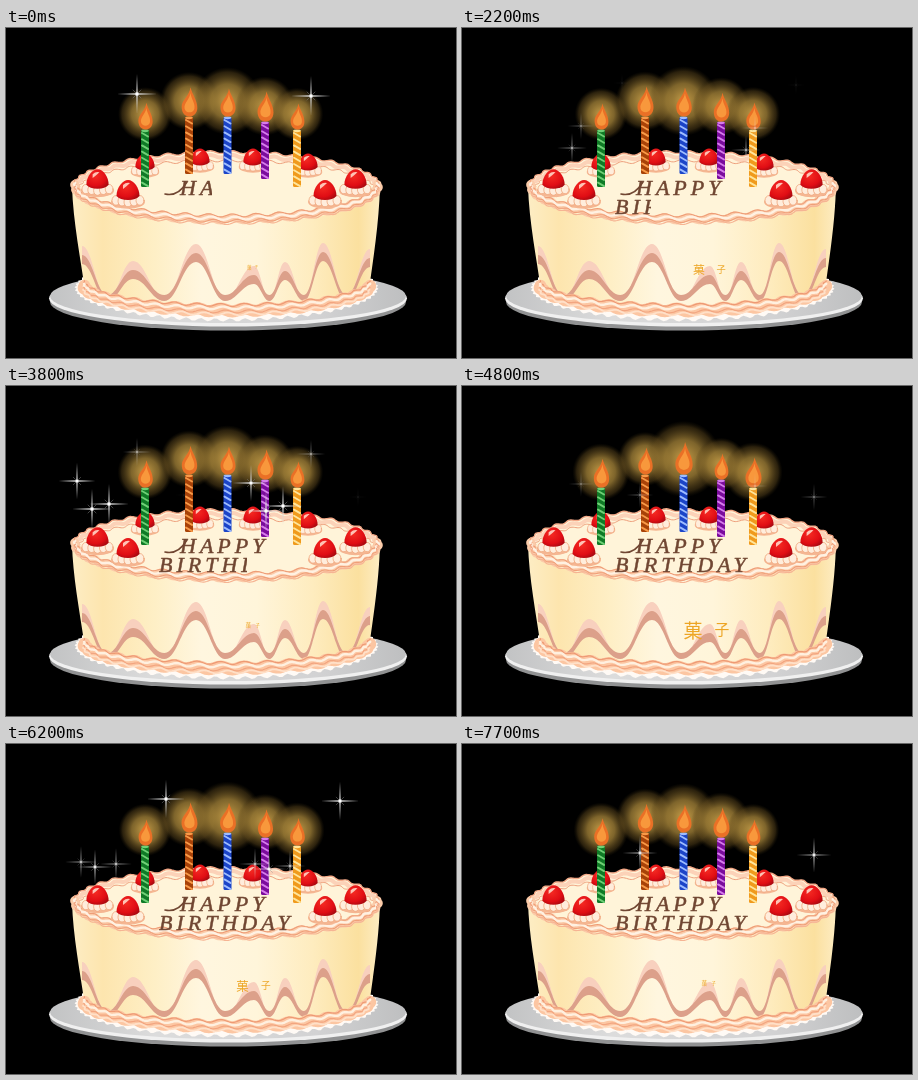
An HTML page that plays this animation: 450x330 px, repeating every 7.8 s.

```html
<!DOCTYPE html>
<html lang="en">
<head>
<meta charset="utf-8">
<title>Birthday cake</title>
<style>
html, body { margin: 0; width: 100%; height: 100%; overflow: hidden; background: #000; }
svg { display: block; width: 450px; height: 330px; }
.icing { font: italic 22px "Liberation Serif", "Noto Serif", serif; letter-spacing: 4px; fill: #704632; stroke: #704632; stroke-width: .5; }
.name { font: 500 20px "Noto Sans CJK JP", "Noto Sans CJK", sans-serif; fill: #eda524; text-anchor: middle; }
</style>
</head>
<body>
<svg viewBox="0 0 450 330" fill="none" stroke-linecap="round" stroke-linejoin="round">
  <defs>
    <radialGradient id="glow">
      <stop offset="0" stop-color="#d0a64c" stop-opacity=".95"/>
      <stop offset=".5" stop-color="#a8863a" stop-opacity=".75"/>
      <stop offset=".85" stop-color="#6b5220" stop-opacity=".4"/>
      <stop offset="1" stop-color="#3a2c0c" stop-opacity="0"/>
    </radialGradient>
    <linearGradient id="side">
      <stop offset="0" stop-color="#fdedc4"/>
      <stop offset=".1" stop-color="#fde5ae"/>
      <stop offset=".27" stop-color="#feefc6"/>
      <stop offset=".42" stop-color="#fff6df"/>
      <stop offset=".6" stop-color="#fff5da"/>
      <stop offset=".78" stop-color="#feecbf"/>
      <stop offset=".93" stop-color="#fbe09f"/>
      <stop offset="1" stop-color="#fdecc2"/>
    </linearGradient>
    <linearGradient id="plate">
      <stop offset="0" stop-color="#c2c3c4"/>
      <stop offset=".3" stop-color="#dcdcdc"/>
      <stop offset=".75" stop-color="#d2d2d3"/>
      <stop offset="1" stop-color="#bebfc0"/>
    </linearGradient>
    <radialGradient id="berry" cx=".4" cy=".35" r=".75">
      <stop offset="0" stop-color="#f52a22"/>
      <stop offset=".65" stop-color="#e00d14"/>
      <stop offset="1" stop-color="#a00810"/>
    </radialGradient>
    <clipPath id="row1"><rect x="150" y="148" height="22"/></clipPath>
    <clipPath id="row2"><rect x="140" y="169" height="24"/></clipPath>
  </defs>
  <g id="glows"></g>
  <g id="cake"></g>
  <g clip-path="url(#row1)">
    <path d="M159,166Q172,169 181,154" stroke="#704632" stroke-width="1.6"/>
    <text class="icing" x="174" y="167">HAPPY</text>
  </g>
  <g clip-path="url(#row2)"><text class="icing" x="153" y="186">BIRTHDAY</text></g>
  <g class="name"><text id="name1">菓</text><text id="name2">子</text></g>
  <g id="candles"></g>
  <g id="stars"></g>
</svg>
<script>
const STEP = 100, COUNT = 78, TAU = Math.PI * 2, CENTER = 220.5;
const $ = id => document.getElementById(id);

function set(node, attrs) {
  for (const key in attrs) node.setAttribute(key, attrs[key]);
}
function add(parent, tag, attrs = {}) {
  const node = document.createElementNS("http://www.w3.org/2000/svg", tag);
  set(node, attrs);
  parent.appendChild(node);
  return node;
}
const shape = (parent, d, fill) => add(parent, "path", { d, fill });
const line = (parent, d, stroke, width) => add(parent, "path", { d, stroke, "stroke-width": width });
const ellipse = (parent, cx, cy, rx, ry, fill) => add(parent, "ellipse", { cx, cy, rx, ry, fill });

// Part of an ellipse with a ripple along it; angles in turns, clockwise from the right.
function ripple(cy, rx, ry, from, to, amp, waves, phase = 0) {
  let d = "";
  for (let i = 0; i <= 300; i++) {
    const a = from + (to - from) * i / 300;
    const r = amp * Math.sin(TAU * (a * waves + phase));
    const x = CENTER + (rx + r * .6) * Math.cos(TAU * a);
    const y = cy + (ry + r) * Math.sin(TAU * a);
    d += (i ? "L" : "M") + x.toFixed(1) + "," + y.toFixed(1);
  }
  return d;
}

// Linear interpolation through [time, value] pairs.
function track(keys, t) {
  const i = keys.findIndex(([time]) => time >= t);
  if (i < 0) return keys[keys.length - 1][1];
  if (i === 0) return keys[0][1];
  const [t0, v0] = keys[i - 1], [t1, v1] = keys[i];
  return v0 + (v1 - v0) * (t - t0) / (t1 - t0);
}

// Curve through crests and troughs, level at each.
function waveThrough(points) {
  return points.map(([x, y], i) => {
    if (!i) return `${x},${y}`;
    const [x0, y0] = points[i - 1], bend = (x - x0) * .42;
    return `C${x0 + bend},${y0} ${x - bend},${y} ${x},${y}`;
  }).join("");
}

function drawDrips(g) {
  const crests = [[76, 218], [127, 233], [190, 216], [248, 238], [279, 234], [317, 215], [364, 221]];
  const points = crests.flatMap(([x, y], i) => i ? [[(x + crests[i - 1][0]) / 2, 270], [x, y]] : [[x, y]]);
  const sink = (crest, trough) => points.map(([x, y]) => [x, y + (y < 260 ? crest : trough)]);
  const band = (upper, lower, fill) => shape(g, "M" + waveThrough(upper) + "L" + waveThrough(lower.reverse()) + "Z", fill);
  band(points, sink(12, 3), "#f8d0be");
  band(sink(9, -3), sink(18, 3), "#dca08a");
}

function drawBerry(x, y, scale) {
  const g = add($("cake"), "g", { transform: `translate(${x} ${y}) scale(${scale})` });
  ellipse(g, 0, 12, 17, 6.8, "#f5b692");
  for (let i = -2; i <= 2; i++)
    set(ellipse(g, i * 6, 12 - Math.abs(i) * .8, 4, 4.8, "#ffeddc"), { stroke: "#efa67c", "stroke-width": .8 });
  shape(g, "M-11.5,6C-11.5,-3-5,-10 0,-10C6,-10 11.5,-2 11.5,6Q8,10 0,10Q-8,10-11.5,6Z", "url(#berry)");
  shape(g, "M-5,-5Q-2,-8 2,-7Q-1,-4-5,-1Z", "#ffc3b5");
}

function drawCake() {
  const g = $("cake");
  ellipse(g, 222, 274, 178, 28.5, "#919293");
  ellipse(g, 222, 270.5, 179, 28, "#f0f0f0");
  ellipse(g, 222, 268, 178, 27, "url(#plate)");
  shape(g, ripple(260, 151, 32, 0, 1, 1.6, 64) + "Z", "#fffaf5");
  shape(g, "M66,158C67,194 75,232 79,263Q100,285 222,287Q342,285 363,262C367,232 373,196 374,158Z", "url(#side)");
  drawDrips(g);

  // Lower frill
  const lower = (dy, phase) => ripple(257 + dy, 143, 25, .005, .495, 1.4, 38, phase);
  line(g, lower(0, 0), "#fcc6a2", 12);
  line(g, lower(-5, 0), "#ee9a74", 1.2);
  line(g, lower(-2, .1), "#fff0df", 2.4);
  line(g, lower(1.5, .2), "#f2a580", 1.2);
  line(g, lower(4, .3), "#ffe0c8", 1.8);

  // Top surface and rim
  shape(g, ripple(159, 154, 35, 0, 1, 1.3, 44) + "Z", "#fff4d9");
  const back = (inset, phase) => ripple(159 + inset * .4, 154 - inset, 35 - inset, .5, 1, 1.4, 44, phase);
  line(g, back(0, 0), "#f3a887", 1.4);
  line(g, back(3, 0), "#fcd2b8", 4);
  line(g, back(6, .2), "#ee9f7c", 1);
  const rim = (dy, phase) => ripple(158 + dy, 151.5, 33, -.01, .51, 1.5, 40, phase);
  line(g, rim(0, 0), "#fbcba9", 8);
  line(g, rim(-3.5, 0), "#ee9d77", 1.1);
  line(g, rim(-.8, .1), "#fff1e2", 2.4);
  line(g, rim(2, .2), "#ef9f79", 1.1);
  line(g, rim(4, .25), "#f6b493", 1.2);

  for (const [offset, y, scale] of [[81.5, 134, .84], [26.5, 129, .84], [129, 151, .97], [98.5, 162, 1]])
    for (const side of [-1, 1]) drawBerry(CENTER + side * offset, y, scale);
}

const candles = [
  { x: 139, top: 102, dark: "#0f7a26", light: "#6fd076", peak: .65 },
  { x: 183, top: 89, dark: "#a84208", light: "#f99a48", peak: .13 },
  { x: 221.5, top: 89, dark: "#1b44c8", light: "#9dbcff", peak: .46 },
  { x: 259, top: 94, dark: "#7a0c9c", light: "#d67cec", peak: .95 },
  { x: 291, top: 102, dark: "#f09a1c", light: "#ffe59a", peak: .46 }
];

function drawCandle(c) {
  const g = $("candles"), height = 57, middle = c.x === 221.5;
  c.radius = middle ? 36 : 28;
  c.size = middle ? 1.06 : .98;
  add(g, "rect", { x: c.x - 4, y: c.top, width: 8, height, rx: 1.5, fill: c.dark });
  for (let y = c.top + 3; y < c.top + height - 4; y += 6.2)
    line(g, `M${c.x - 3},${y}l6,3.5`, c.light, 1.9);
  ellipse(g, c.x, c.top + .8, 3.8, 1.4, c.light);
  c.glow = add($("glows"), "circle", { cx: c.x, cy: c.top - 16, fill: "url(#glow)" });
  c.flame = add(g, "g");
  shape(c.flame, "M1,-30C3,-22 8,-17 8,-9C8,-3 4,0 0,0C-5,0-8,-4-8,-10C-8,-17 0,-21 1,-30Z", "#ea7026");
  shape(c.flame, "M1,-24C2,-17 6,-14 5,-8C4,-3-4,-3-5,-8C-6,-14 0,-17 1,-24Z", "#f8983c");
}

// Each sparkle flashes again after its period and has a twin to the right.
const SPARKLE_PERIOD = 34.5, SPARKLE_LIFE = 6.5;
const sparkles = [
  [131, 66, 0], [178, 109, 9.5], [119, 98, 18], [110, 120, 25], [160, 55, 28], [89, 123, 29], [75, 118, 30],
  [71, 95, 37, COUNT], [86, 123, 38, COUNT], [103, 118, 38, COUNT]
].map(([x, y, peak, period = SPARKLE_PERIOD]) => ({ x, y, peak, period }));

function drawSparkle(s) {
  s.node = add($("stars"), "g");
  s.arms = [[0, 0], [174, 2]].map(([dx, dy]) => {
    const spot = add(s.node, "g", { transform: `translate(${s.x + dx} ${s.y + dy})` });
    const g = add(spot, "g");
    shape(g, "M0,-20L.7,-.7L20,0L.7,.7L0,20L-.7,.7L-20,0L-.7,-.7Z", "#dcdcdc");
    line(g, "M-4,-4L4,4M-4,4L4,-4", "#888", .5);
    add(g, "circle", { r: 1.7, fill: "#fff" });
    return g;
  });
}

const happyEdge = [[0, 206], [900, 257], [1000, 266]];
const birthdayEdge = [[1000, 150], [3800, 241], [4700, 294]];
const NAME_PERIOD = 3900;
const nameSize = [[0, .24], [900, 1], [1400, 1], [2000, .56], [2800, .82], [3900, .24]];

function placeName(node, x, y, size) {
  set(node, { transform: `translate(${x} ${y}) scale(${size}) translate(0 7.2)` });
}

function render(step) {
  const t = step * STEP;
  set($("row1").firstElementChild, { width: track(happyEdge, t) - 150 });
  set($("row2").firstElementChild, { width: track(birthdayEdge, t) - 140 });

  const size = track(nameSize, t % NAME_PERIOD);
  placeName($("name1"), 247 - 16 * size, 237 + 8 * size, size * .95);
  placeName($("name2"), 245 + 15 * Math.min(1, size * 1.5), 237 + 7 * size, size * .74);

  for (const c of candles) {
    const wave = Math.cos(TAU * (step * 2 / 39 - c.peak));
    const scale = c.size * (.95 + .07 * wave);
    set(c.glow, { r: c.radius * (1 + .06 * wave) });
    set(c.flame, { transform: `translate(${c.x + .5} ${c.top - .5}) scale(${scale})` });
  }

  for (const s of sparkles) {
    const cycles = Math.round((step - s.peak) / s.period);
    const life = Math.max(0, 1 - Math.abs(step - s.peak - Math.max(0, cycles) * s.period) / SPARKLE_LIFE);
    set(s.node, { opacity: Math.min(1, life * 1.2) });
    s.arms.forEach(g => set(g, { transform: `scale(${.45 + .55 * life})` }));
  }
}

drawCake();
candles.forEach(drawCandle);
sparkles.forEach(drawSparkle);

const start = performance.now();
let shown = -1;
function tick() {
  const step = Math.floor((performance.now() - start) / STEP) % COUNT;
  if (step !== shown) render(shown = step);
  requestAnimationFrame(tick);
}
tick();
</script>
</body>
</html>
```
